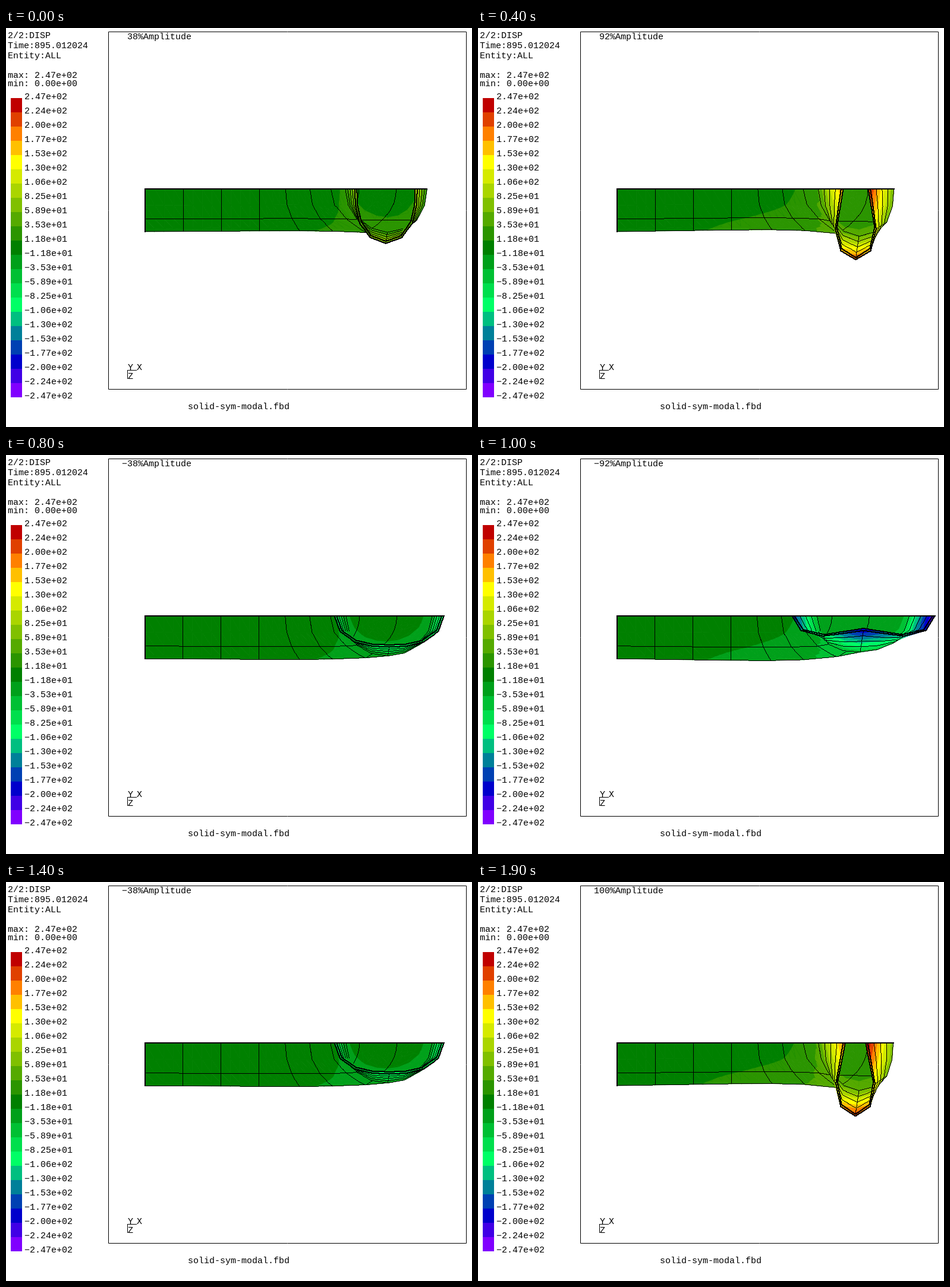
An HTML page with a canvas that plays this animation: 784x672 px, repeating every 2000 ms.

```html
<!DOCTYPE html>
<html lang="en">
<head>
<meta charset="utf-8">
<title>Modal shape</title>
<style>
html, body { margin: 0; width: 100%; height: 100%; overflow: hidden; background: #fff; }
canvas { display: block; }
</style>
</head>
<body>
<canvas id="stage" width="784" height="672"></canvas>
<script>
const ctx = document.getElementById('stage').getContext('2d');
const MAX = 247.4, BAND = MAX / 10.5;
const LEFT = 234, CX = 642, CY = 270.5, R_OUT = 72.5, R_IN = 69;
const LEVELS = 4, SEGMENTS = 8, FLOOR_RINGS = 8, SUBCOLS = 4;

const range = (n, f) => Array.from({ length: n }, (_, i) => f(i));
const mix = (p, q, f) => p.map((v, i) => v + (q[i] - v) * f);

// Colour scale from red at the top to violet at the bottom: [index, r, g, b]
const stops = [[0, 192, 0, 0], [2, 255, 128, 0], [4, 255, 255, 0], [10, 0, 128, 0],
  [14, 0, 255, 102], [18, 0, 0, 204], [20, 128, 0, 255]];
const colors = range(21, i => {
  const n = Math.max(1, stops.findIndex(s => s[0] >= i));
  const p = stops[n - 1], q = stops[n];
  const [, ...rgb] = mix(p, q, (i - p[0]) / (q[0] - p[0]));
  return `rgb(${rgb.map(Math.round)})`;
});

// A node is [x, y, dx, dy, value]; displacement and value scale with amplitude
const move = (n, a) => [n[0] + a * n[2], n[1] + a * n[3], a * n[4]];
const moveAll = (nodes, a) => nodes.map(n => move(n, a));

// Half tube seen along its axis, angle from left through bottom to right.
// Level 0 is the base, level 1 the free rim.
function tubeNode(r, level, i) {
  const t = i * Math.PI / SEGMENTS, c = Math.cos(t), s = Math.sin(t);
  const x = CX - r * c, y = CY + r * s;
  const dx = 52 * c ** 3 - 7, dy = 51.4 * s ** 3;
  const foot = [x, y, 9.5 * c ** 3 - 5.5 * c ** 4 - 1, 12 * s ** 3 - 3 * c * s * s, 53 - 13 * c];
  return mix(foot, [x, y, dx, dy, 4.1 * Math.hypot(dx, dy)], level);
}
const ring = (r, level) => range(SEGMENTS + 1, i => tubeNode(r, level, i));
const walls = [[R_OUT, -1], [R_IN, 1]].map(([r, side]) => ({
  side, rings: range(LEVELS + 1, k => ring(r, k / LEVELS))
}));
const base = walls[0].rings[0];

// Displacement value over the bar: steep along the top, gradual along the bottom
function barValue(x, y) {
  const s = x - LEFT, u = Math.max(0, (y - CY) / R_OUT);
  const top = Math.min(40, 12.8 * (s / 300) ** 10);
  const bottom = 12.8 * (s / 151) ** 1.38;
  return top + (bottom - top) * u ** 1.55;
}

// Bar rows share their heights with the tube nodes; later columns curve outwards
const depth = range(5, j => Math.sin(j * Math.PI / SEGMENTS));
const curveX = (top, reach, u) => top + reach * u ** 2.3;
function barColumn(i) {
  const k = i - 4;
  const top = k < 0 ? LEFT + 64 * i : 470 + 44 * k - 3 * k * k;
  const reach = k < 0 ? 0 : 494 + 55.5 * k - top;
  return depth.map(u => {
    const x = curveX(top, reach, u), s = x - LEFT;
    const sag = 18.8 * (s / 408) ** 6.8 - s / 60;
    return [x, CY + R_OUT * u, s / 300, sag * u ** 1.3, 0];
  });
}
const columns = [...range(7, barColumn), base.slice(0, 5)];
const barGrid = range((columns.length - 1) * SUBCOLS + 1, n => {
  const c = Math.min(Math.floor(n / SUBCOLS), columns.length - 2);
  return columns[c].map((p, j) => {
    const node = mix(p, columns[c + 1][j], n / SUBCOLS - c);
    node[4] = barValue(node[0], node[1]);
    return node;
  });
});

// Floor seen through the tube
const hub = [CX, CY, 0, 0, 20];
const floorGrid = range(FLOOR_RINGS + 1, k => base.map((b, i) => {
  const f = k / FLOOR_RINGS, node = mix(hub, b, f);
  const v = 20 + 7 * f + 9 * f * Math.sin(i * Math.PI / SEGMENTS);
  node[4] = v + (b[4] - v) * f ** 8;
  return node;
}));
const floorRib = (top, end) => range(7, i => {
  const u = end * i / 6;
  return [curveX(top, -51, u), CY + R_OUT * u, 1.5 * (u - 1), 3.3 * u, 0];
});
const floorLines = [floorRib(657, 1), floorRib(594, .5), [base[2], base[6]]];

// Hard-edged line made of whole pixels
function line(p, q, w = 1) {
  const dx = q[0] - p[0], dy = q[1] - p[1], o = (w - 1) / 2;
  const n = Math.max(1, Math.ceil(Math.max(Math.abs(dx), Math.abs(dy))));
  ctx.fillStyle = '#000';
  for (let i = 0; i <= n; i++) {
    ctx.fillRect(Math.floor(p[0] + dx * i / n - o), Math.floor(p[1] + dy * i / n - o), w, w);
  }
}
const path = (pts, w) => pts.slice(1).forEach((p, i) => line(pts[i], p, w));

function clipAbove(poly, t) {
  const out = [];
  poly.forEach((p, i) => {
    const q = poly[(i + 1) % poly.length];
    if (p[2] >= t) out.push(p);
    if ((p[2] >= t) !== (q[2] >= t)) out.push(mix(p, q, (t - p[2]) / (q[2] - p[2])));
  });
  return out;
}

// The thin stroke closes the seams between neighbours
function fill(poly, color) {
  ctx.beginPath();
  poly.forEach(p => ctx.lineTo(p[0], p[1]));
  ctx.closePath();
  ctx.fillStyle = ctx.strokeStyle = color;
  ctx.lineWidth = .9;
  ctx.fill();
  ctx.stroke();
}

// Fill a polygon in flat colour bands
function contour(...poly) {
  const bands = poly.map(p => Math.round(p[2] / BAND));
  const lo = Math.min(...bands), hi = Math.max(...bands);
  for (let k = lo; k <= hi; k++) {
    const part = k === lo ? poly : clipAbove(poly, (k - .5) * BAND);
    if (part.length > 2) fill(part, colors[Math.max(0, Math.min(20, 10 - k))]);
  }
}
function strip(p, q) {
  for (let i = 0; i < p.length - 1; i++) {
    contour(p[i], q[i], q[i + 1]);
    contour(p[i], q[i + 1], p[i + 1]);
  }
}
const cross = (p, q, r) => (q[0] - p[0]) * (r[1] - p[1]) - (q[1] - p[1]) * (r[0] - p[0]);

function drawBar(a) {
  const grid = barGrid.map(c => moveAll(c, a));
  grid.slice(1).forEach((c, i) => strip(grid[i], c));
  const lines = columns.map(c => moveAll(c, a));
  lines.slice(1, -1).forEach(c => path(c));
  path(lines.map(c => c[2]));
  path(lines.map(c => c[4]));
  line([LEFT, 271], [LEFT, 343], 2);
}

function drawFloor(a) {
  const grid = floorGrid.map(r => moveAll(r, a));
  grid.slice(1).forEach((r, i) => strip(grid[i], r));
  floorLines.forEach(l => path(moveAll(l, a)));
}

// Only faces turned to the viewer are drawn, from the base up to the rim
function drawTube(a) {
  const sides = walls.map(w => ({ side: w.side, rings: w.rings.map(r => moveAll(r, a)) }));
  for (let k = 0; k < LEVELS; k++) {
    const edges = [];
    for (const { side, rings } of sides) {
      const lo = rings[k], hi = rings[k + 1];
      for (let i = 0; i < SEGMENTS; i++) {
        const j = i + 1;
        if (cross(lo[i], lo[j], hi[j]) * side > .01) {
          contour(lo[i], lo[j], hi[j]);
          edges.push([lo[i], lo[j]]);
          if (j % 2 === 0) edges.push([lo[j], hi[j]]);
        }
        if (cross(lo[i], hi[j], hi[i]) * side > .01) {
          contour(lo[i], hi[j], hi[i]);
          if (i % 2 === 0) edges.push([lo[i], hi[i]]);
        }
      }
    }
    edges.forEach(e => line(...e));
  }
  const [outer, inner] = sides.map(s => s.rings[LEVELS]);
  strip(outer, inner);
  path(outer, 2);
  path(inner, 2);
  const right = Math.max(outer[SEGMENTS][0], move(base[SEGMENTS], a)[0]);
  line([LEFT, 271], [right, 271], 2);
}

function text(s, x, y) {
  ctx.fillStyle = '#000';
  ctx.fillText(s, x, y);
}
// Numbers use the wide minus sign
const number = s => String(s).replace(/^-/, '\u2212');

function drawLegend() {
  text('2/2:DISP', 3, 17);
  text('Time:895.012024', 3, 34);
  text('Entity:ALL', 3, 51);
  text('max: 2.47e+02', 3, 84);
  text('min: 0.00e+00', 3, 98);
  colors.forEach((c, i) => {
    ctx.fillStyle = c;
    ctx.fillRect(8, 118 + 24 * i, 19, 24);
  });
  for (let i = 0; i <= 21; i++) {
    const v = MAX * (1 - 2 * i / 21);
    text(number(v.toExponential(2).replace('e+', 'e+0')), 31, 120 + 24 * i);
  }
  text('solid-sym-modal.fbd', 306, 642);
  ctx.strokeStyle = '#000';
  ctx.lineWidth = 1;
  ctx.strokeRect(172.5, 6.5, 602, 602);
}

function drawAxes() {
  line([204, 576], [219, 576]);
  line([204, 576], [204, 590]);
  text('Y', 205, 576);
  text('X', 220, 576);
  text('Z', 205, 591);
}

function draw(step) {
  const a = Math.sin((step + 1) * Math.PI / 8);
  ctx.fillStyle = '#fff';
  ctx.fillRect(0, 0, 784, 672);
  ctx.font = '15px "Liberation Mono", monospace';
  ctx.lineJoin = 'round';
  drawLegend();
  const percent = number(Math.round(a * 100));
  text(percent + '%Amplitude', 222 - 9 * percent.length, 19);
  drawBar(a);
  drawFloor(a);
  drawTube(a);
  drawAxes();
}

const start = performance.now();
let shown = -1;
function tick() {
  const step = Math.floor((performance.now() - start) / 100) % 20;
  if (step !== shown) draw(shown = step);
  requestAnimationFrame(tick);
}
tick();
</script>
</body>
</html>
```
